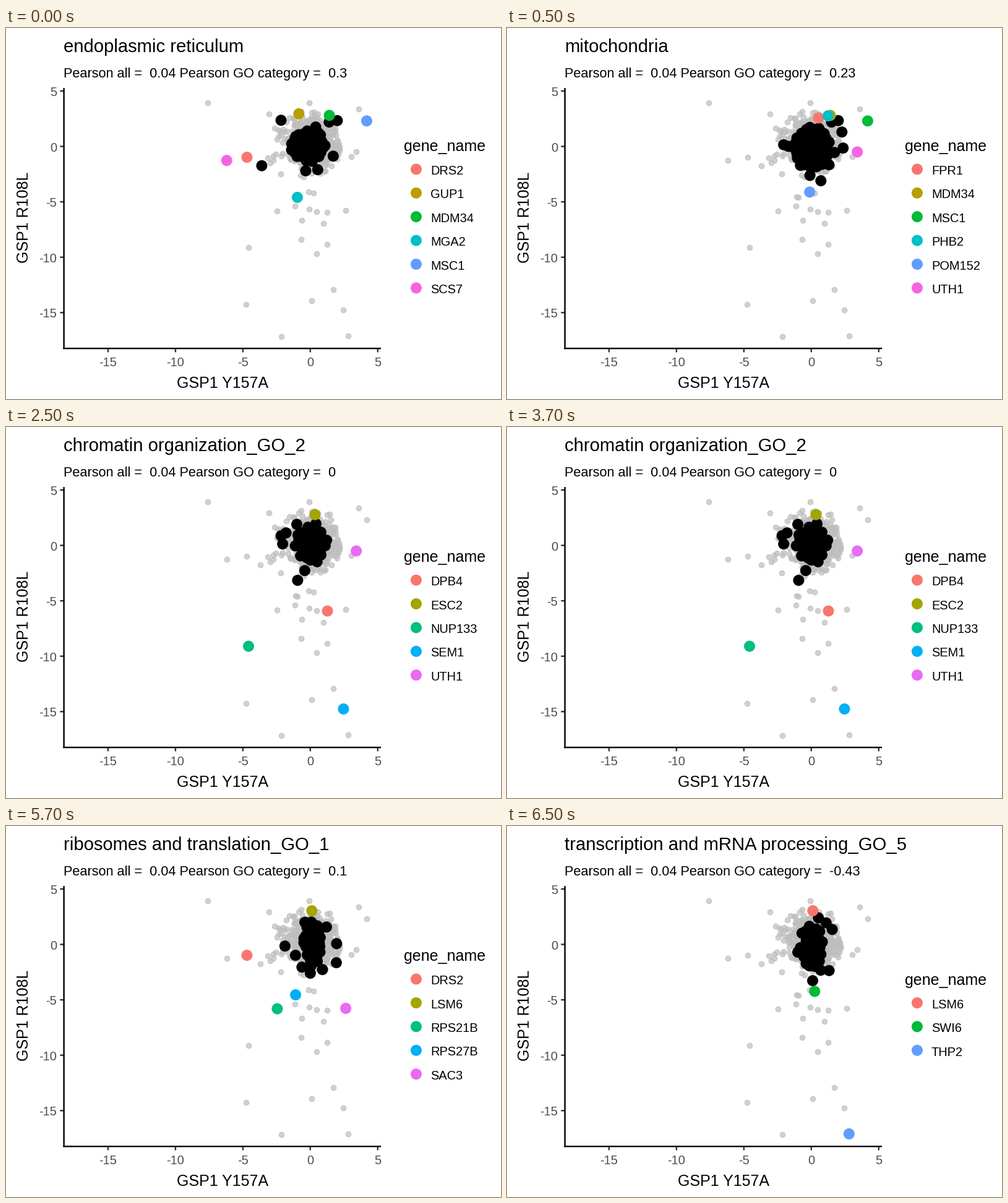
Animation, 800 px wide and 600 px high, one loop 8000 ms. Source, as a matplotlib script:

```python
import matplotlib.pyplot as plt
import numpy as np
from matplotlib.animation import FuncAnimation

W, H, DPI = 800, 600, 100
PX = 72 / DPI  # points per pixel
X0, Y0, DX, DY = 491.8, 191.5, 21.79, 17.92  # data origin and unit in pixels
rng = np.random.default_rng(108)

plt.rcParams["font.family"] = "Liberation Sans"
fig = plt.figure(figsize=(W / DPI, H / DPI), dpi=DPI, facecolor="white")
ax = fig.add_axes([0, 0, 1, 1])
ax.set(xlim=(0, W), ylim=(H, 0))
ax.axis("off")


def text(x, y, s, size, color="black", **kw):
    return ax.text(x, y, s, fontsize=size * PX, color=color, va="baseline", **kw)


def dots(points, radius, color, z, alpha=1, edge=0.0):
    xy = np.reshape(points, (-1, 2))
    return ax.scatter(xy[:, 0], xy[:, 1], s=(2 * radius * PX) ** 2, c=color, alpha=alpha,
                      linewidths=edge * PX, edgecolors=color if edge else "none",
                      snap=False, zorder=z)


def line(x, y, color, z):
    ax.plot(x, y, color=color, lw=2.4 * PX, solid_capstyle="butt", snap=False, zorder=z)


def to_px(points):
    return np.reshape(points, (-1, 2)) * [DX, -DY] + [X0, Y0]


def blob(cx, cy, rx, ry, n):
    """Evenly filled ellipse (golden-angle spiral) with a little jitter."""
    i = np.arange(n) + 0.5
    r, a = np.sqrt(i / n), i * np.pi * (3 - np.sqrt(5))
    spiral = np.column_stack([cx + rx * r * np.cos(a), cy + ry * r * np.sin(a)])
    return spiral + rng.normal(0, 0.08, (n, 2))


def cloud(cx, cy, sx, sy, n, reach):
    """Normal scatter cut off at a number of deviations."""
    p = rng.normal(size=(n, 2))
    p = p[np.hypot(p[:, 0], p[:, 1]) < reach]
    return p * [sx, sy] + [cx, cy]


# scores of the labelled genes
GENES = dict(
    DRS2=(-4.7, -0.98), GUP1=(-0.85, 2.94), MDM34=(1.41, 2.8), MGA2=(-0.96, -4.6),
    MSC1=(4.18, 2.3), SCS7=(-6.2, -1.27), FPR1=(0.53, 2.57), PHB2=(1.24, 2.76),
    POM152=(-0.12, -4.12), UTH1=(3.41, -0.5), DPB4=(1.27, -5.92), ESC2=(0.35, 2.78),
    NUP133=(-4.58, -9.1), SEM1=(2.46, -14.76), LSM6=(0.11, 3.04), RPS21B=(-2.45, -5.81),
    RPS27B=(-1.09, -4.55), SAC3=(2.63, -5.77), SWI6=(0.25, -4.24), THP2=(2.8, -17.1),
)

ISOLATED = [
    (-7.62, 3.93), (-0.08, 3.96), (3.57, 3.36), (-3.07, 2.92), (-4.77, -14.23),
    (-2.15, -17.15), (1.72, -12.91), (0.08, -13.9), (0.45, -9.66), (1.27, -8.82),
    (-0.68, -8.38), (0.97, -6.94), (-0.65, -6.67), (0.45, -5.9), (-0.1, -5.65),
    (-1.14, -5.38), (-3.7, -1.78), (3.02, -0.94),
]

PALETTES = {
    6: ["#F8766D", "#B79F00", "#00BA38", "#00BFC4", "#619CFF", "#F564E3"],
    5: ["#F8766D", "#A3A500", "#00BF7D", "#00B0F6", "#E76BF3"],
    3: ["#F8766D", "#00BA38", "#619CFF"],
}


def draw_axes():
    line([93.6, 93.6], [97, 519.2], "black", 8)
    line([92.4, 606], [518.2, 518.2], "black", 8)
    for v in range(5, -16, -5):
        x, y = to_px((v, v))[0]
        line([87.3, 93.6], [y, y], "#333333", 7)
        line([x, x], [518, 524.4], "#333333", 7)
        text(82.3, y + 8, str(v), 20, "#4D4D4D", ha="right")
        text(x, 547, str(v), 20, "#4D4D4D", ha="center")
    text(349.5, 582, "GSP1 Y157A", 25, ha="center")
    text(35.5, 306.8, "GSP1 R108L", 25, ha="center", rotation=90, rotation_mode="anchor")


def make_scene(title, pearson, core, strays, names):
    """Build the artists of one category: heading, points and legend."""
    colors = PALETTES[len(names)]
    artists = [
        text(93, 39, title, 29.25),
        text(93, 80, f"Pearson all =  0.04 Pearson GO category =  {pearson}", 21.77),
        dots(to_px(np.vstack([blob(*core), strays])), 9, "black", 3),
    ]
    top = 324.4 - 19.2 * (len(names) - 1)
    artists.append(text(643, top - 29.5, "gene_name", 25))
    for i, (name, color) in enumerate(zip(names, colors)):
        y = top + 38.4 * i
        artists += [dots(to_px(GENES[name]), 9, color, 4), dots((662.9, y), 9, color, 4),
                    text(686, y + 8.7, name, 20)]
    return artists


draw_axes()
grey = np.vstack([ISOLATED, list(GENES.values()),
                  cloud(0.25, 0.2, 0.85, 1.15, 560, 2.4),
                  cloud(-0.6, 0, 1.35, 1.6, 80, 2.1)])
dots(to_px(grey), 4.15, "#BEBEBE", 2, alpha=0.7, edge=1.5)

scenes = [
    make_scene("endoplasmic reticulum", "0.3", (-0.17, 0.07, 1.25, 1.4, 70),
               [(-2.17, 2.36), (-3.6, -1.74), (1.7, -0.88), (2, 2.33), (1.4, 2.2),
                (-0.34, -2.2), (0.55, -2.1), (0.4, 1.75)],
               ["DRS2", "GUP1", "MDM34", "MGA2", "MSC1", "SCS7"]),
    make_scene("mitochondria", "0.23", (0.05, -0.1, 1.3, 1.9, 90),
               [(-0.1, -2.62), (0.71, -3.1), (1.31, -1.66), (1.72, -0.55), (2.36, -0.15),
                (2.27, 1.3), (2, 2.33), (1.5, 2.2), (-2.05, 0.15), (-1.7, 0)],
               ["FPR1", "MDM34", "MSC1", "PHB2", "POM152", "UTH1"]),
    make_scene("chromatin organization_GO_2", "0", (0.08, 0.1, 1.15, 1.65, 34),
               [(-1, 1.9), (-1.8, 1.13), (-2.17, 0.87), (-2.05, 0.13), (-0.41, -2.27),
                (-0.94, -3.15), (0.42, 1.95)],
               ["DPB4", "ESC2", "NUP133", "SEM1", "UTH1"]),
    make_scene("ribosomes and translation_GO_1", "0.1", (0.17, 0, 0.75, 2, 30),
               [(-0.4, 2), (1.2, 1.57), (-1.88, -0.15), (-1.1, -0.98), (1.95, 0.07),
                (1.93, -1.65), (0, -2.6), (0.9, -2.27), (-0.62, -2.05)],
               ["DRS2", "LSM6", "RPS21B", "RPS27B", "SAC3"]),
    make_scene("transcription and mRNA processing_GO_5", "-0.43", (0.05, -0.15, 0.8, 2, 34),
               [(0.53, 2.4), (1.1, 1.95), (1.55, 1.35), (0.7, -2.33), (1.32, -2.36),
                (0.1, -3.27), (-1, -0.7)],
               ["LSM6", "SWI6", "THP2"]),
]


def update(frame):
    current = (frame + 3) // 4  # first scene lasts one step, the others four
    for i, artists in enumerate(scenes):
        for artist in artists:
            artist.set_visible(i == current)
    return []


anim = FuncAnimation(fig, update, frames=16, interval=500, repeat=True, repeat_delay=0)
plt.show()
```
